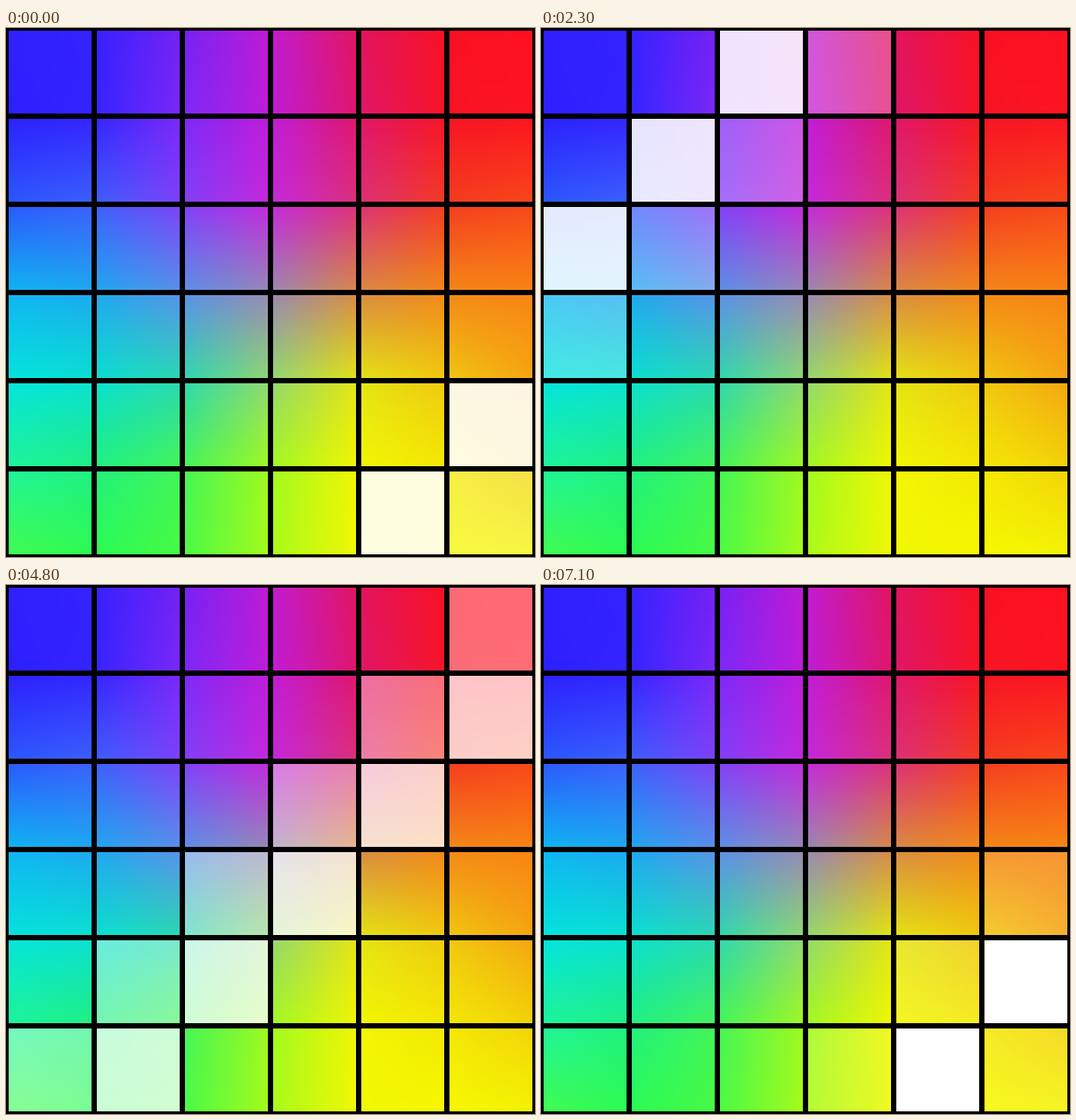
Write an HTML page with a canvas that moves like this. It is 600x600 px and loops after 7.2 s.

```html
<!DOCTYPE html>
<html lang="en">
<head>
<meta charset="utf-8">
<title>Rainbow grid wave</title>
<style>
  html, body { margin: 0; width: 100%; height: 100%; overflow: hidden; background: #000; }
  canvas { display: block; width: 100vw; height: 100vh; }
</style>
</head>
<body>
<canvas id="stage" width="600" height="600"></canvas>
<script>
const SIZE = 600, CELLS = 6, CELL = SIZE / CELLS, GAP = 3;
const LOOP = 7200, STEP = 100;
const FADE = 800, DELAY = 700;

// Colours at the corners of the cells, row by row.
const MESH = [
  '2f20ff 3522ff 7620f4 c01cd2 e2145f f81022 ff1020',
  '2c20ff 3424ff 7c28f8 c01cd8 e0166a f71424 fc1420',
  '2a58fc 3c60fc 8040f8 c428dc dc3078 f43c20 f84818',
  '0eb6f2 1ea8f0 5a90e8 9888b4 d88a44 f38818 f98414',
  '04e4dc 0ae0d0 2cd8b0 92d870 e4e414 f0c810 f5a412',
  '1ef59a 20f080 44f558 a0fa20 f2f604 f4e804 f2d20a',
  '44fc50 2cfb50 48fb44 a8fa1a f0f804 f6f800 f4f404'
].map(row => row.split(' ').map(hex =>
  [0, 2, 4].map(i => parseInt(hex.slice(i, i + 2), 16))));

const ctx = document.getElementById('stage').getContext('2d');
const mix = (a, b, k) => a + (b - a) * k;

function makeGradient() {
  const layer = document.createElement('canvas');
  layer.width = layer.height = SIZE;
  const layerCtx = layer.getContext('2d');
  const image = layerCtx.createImageData(SIZE, SIZE);
  for (let y = 0, p = 0; y < SIZE; y++) {
    const row = Math.floor(y / CELL), v = (y + 0.5) / CELL - row;
    for (let x = 0; x < SIZE; x++, p += 4) {
      const col = Math.floor(x / CELL), u = (x + 0.5) / CELL - col;
      const above = MESH[row], below = MESH[row + 1];
      for (let c = 0; c < 3; c++) {
        image.data[p + c] = mix(
          mix(above[col][c], above[col + 1][c], u),
          mix(below[col][c], below[col + 1][c], u), v);
      }
      image.data[p + 3] = 255;
    }
  }
  layerCtx.putImageData(image, 0, 0);

  // Black lines between the cells and around the edge.
  for (let i = 0; i <= CELLS; i++) {
    layerCtx.fillRect(i * CELL - GAP, 0, 2 * GAP, SIZE);
    layerCtx.fillRect(0, i * CELL - GAP, SIZE, 2 * GAP);
  }
  return layer;
}

// Each diagonal fades to white and back, one after another.
function whiteness(diagonal, time) {
  const peak = FADE + DELAY * diagonal;
  const distance = Math.min(Math.abs(time - peak), Math.abs(time + LOOP - peak));
  return Math.max(0, 1 - distance / FADE);
}

const gradient = makeGradient();

function draw(now) {
  const time = Math.floor((now % LOOP) / STEP) * STEP;
  ctx.drawImage(gradient, 0, 0);
  for (let row = 0; row < CELLS; row++) {
    for (let col = 0; col < CELLS; col++) {
      const alpha = whiteness(row + col, time);
      if (!alpha) continue;
      ctx.fillStyle = `rgba(255, 255, 255, ${alpha})`;
      ctx.fillRect(col * CELL + GAP, row * CELL + GAP, CELL - 2 * GAP, CELL - 2 * GAP);
    }
  }
}

function loop(now) {
  draw(now);
  requestAnimationFrame(loop);
}

draw(0);
requestAnimationFrame(loop);
</script>
</body>
</html>
```
